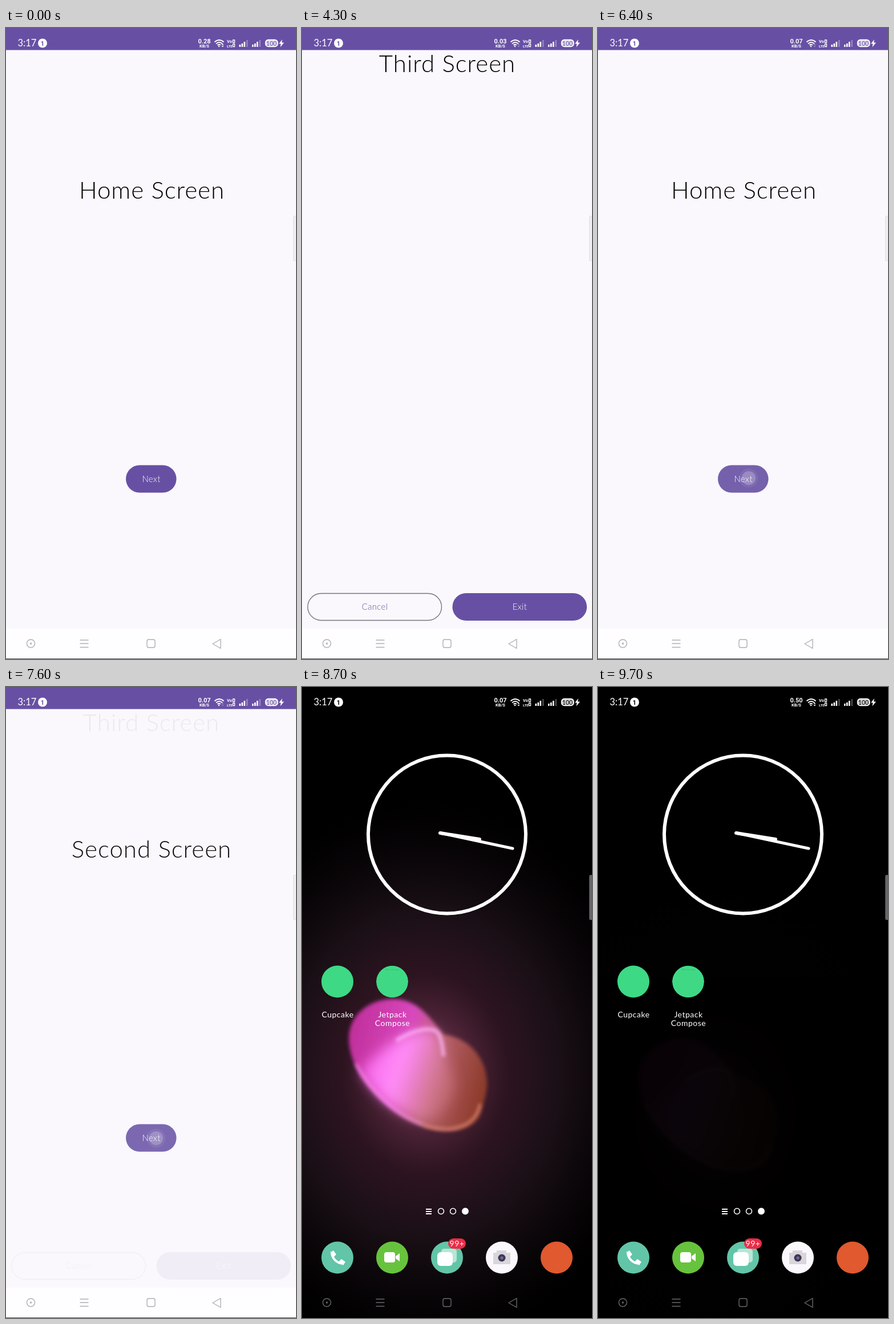
These frames come from a looping animation (508x1102 px, 10000 ms). An HTML page:

```html
<!DOCTYPE html>
<html lang="en">
<head>
<meta charset="utf-8">
<title>Screen navigation</title>
<style>
  html, body { margin: 0; height: 100%; overflow: hidden; background: #000; }
  svg { display: block; width: 100vw; height: 100vh; font-family: Lato, sans-serif; font-weight: 300; }
  .title { font-size: 42px; letter-spacing: 1px; text-anchor: middle; fill: #000; }
  .label { font-size: 15px; letter-spacing: .3px; text-anchor: middle; fill: #fff; }
  .app { font-size: 14px; letter-spacing: .5px; text-anchor: middle; fill: #fff; font-weight: 400; }
  .bold { font-family: Roboto, sans-serif; font-weight: 700; }
  .line { fill: none; stroke-width: 1.4; }
  #status { color: #6750a4; }
</style>
</head>
<body>
<svg viewBox="0 0 508 1102" preserveAspectRatio="none">
  <defs>
    <filter id="soft" x="-50%" y="-50%" width="200%" height="200%"><feGaussianBlur stdDeviation="3"/></filter>
    <filter id="softer" x="-50%" y="-50%" width="200%" height="200%"><feGaussianBlur stdDeviation="11"/></filter>
    <radialGradient id="haze">
      <stop offset="0" stop-color="#b0507f" stop-opacity=".75"/>
      <stop offset=".36" stop-color="#70324f" stop-opacity=".4"/>
      <stop offset=".6" stop-color="#3c2433" stop-opacity=".42"/>
      <stop offset="1" stop-color="#1c0f18" stop-opacity="0"/>
    </radialGradient>
    <linearGradient id="petal" x1="0" y1=".3" x2="1" y2=".55">
      <stop offset="0" stop-color="#c0309c"/>
      <stop offset=".4" stop-color="#d948bd"/>
      <stop offset=".62" stop-color="#b9636f"/>
      <stop offset="1" stop-color="#8e3c2c"/>
    </linearGradient>
    <linearGradient id="fold" x1="0" y1="0" x2="1" y2=".35">
      <stop offset="0" stop-color="#f655e6"/>
      <stop offset=".5" stop-color="#ff8df8"/>
      <stop offset="1" stop-color="#d9808f" stop-opacity=".5"/>
    </linearGradient>
    <clipPath id="cardClip"><rect id="cardRect" width="508" height="1102"/></clipPath>
    <g id="next">
      <rect x="210" y="763.5" width="88.5" height="48" rx="24" fill="#6750a4"/>
      <text class="label" x="254.5" y="793">Next</text>
    </g>
    <g id="bars" fill="#fff">
      <path d="M0 29h2.6v4H0zM4 27h2.6v6H4zM8 24h2.6v9H8z"/>
      <path d="M12.5 21h2.6v12h-2.6z" opacity=".3"/>
    </g>
  </defs>

  <g id="home">
    <g id="glow">
      <ellipse cx="215" cy="675" rx="400" ry="480" fill="url(#haze)"/>
      <path filter="url(#soft)" fill="url(#petal)" d="M82 615C82 570 120 545 160 545C205 545 225 580 248 607C290 612 322 645 324 690C324 712 316 730 314 742C306 768 278 776 250 775C212 772 180 757 150 732C112 700 84 660 82 615Z"/>
      <path filter="url(#softer)" fill="url(#fold)" d="M104 672C130 636 180 600 225 598C246 605 246 640 268 690C262 740 228 762 208 755C164 745 124 706 104 672Z"/>
      <path filter="url(#soft)" fill="none" stroke="#ff9cf2" stroke-width="3" d="M94 658C120 706 165 748 212 764"/>
      <path filter="url(#soft)" fill="none" stroke="#e38a78" stroke-width="4" d="M212 765C262 782 305 768 312 728"/>
      <path filter="url(#soft)" fill="none" stroke="#ffb5fb" stroke-width="5" d="M165 618C195 598 228 592 238 604C245 614 246 630 248 645"/>
    </g>
    <g id="desk">
      <g fill="none" stroke="#fff" stroke-linecap="round">
        <circle cx="254" cy="257.5" r="138" stroke-width="6"/>
        <path d="M242 255L311 266" stroke-width="6"/>
        <path d="M242 255L369 282" stroke-width="5"/>
      </g>
      <circle cx="62" cy="514.5" r="28" fill="#3dd984"/>
      <circle id="icon" cx="158" cy="514.5" r="28" fill="#3dd984"/>
      <text class="app" x="62.5" y="577">Cupcake</text>
      <text class="app" x="158.5" y="577">Jetpack</text>
      <text class="app" x="158.5" y="592">Compose</text>
      <g fill="none" stroke="#fff" stroke-width="1.5">
        <path d="M217 912h10M217 916h10M217 920h10" stroke-width="2"/>
        <circle cx="243.5" cy="915.5" r="5"/>
        <circle cx="264.5" cy="915.5" r="5"/>
        <circle cx="286" cy="915.5" r="5.2" fill="#fff"/>
      </g>
      <circle cx="62" cy="996.5" r="28" fill="#62c5a7"/>
      <path d="M52 986C52 999 62 1007 73 1007" fill="none" stroke="#fff" stroke-width="4"/>
      <path d="M50 988l5-4 5 7-4 4zM65 1003l4-4 7 5-4 6z" fill="#fff"/>
      <circle cx="158" cy="996.5" r="28" fill="#67c33d"/>
      <rect x="144" y="987" width="19" height="18" rx="4" fill="#fff"/>
      <path d="M164 994l7-5v14l-7-5z" fill="#fff"/>
      <circle cx="254" cy="996.5" r="28" fill="#62c5a7"/>
      <rect x="244" y="981" width="27" height="24" rx="5" fill="#b8e5d7"/>
      <rect x="237" y="987" width="27" height="24" rx="6" fill="#fff"/>
      <rect x="256" y="963" width="31" height="18" rx="9" fill="#ec2c47"/>
      <text class="app" x="271.5" y="976.5">99+</text>
      <circle cx="350" cy="996.5" r="28" fill="#fbf8fd"/>
      <path d="M341 984h17v4h7v20h-30v-20h6z" fill="#d8d6da"/>
      <circle cx="350" cy="997" r="6.5" fill="#3f3855"/>
      <circle cx="350" cy="997" r="2.5" fill="#8068a0"/>
      <circle cx="446" cy="996.5" r="28" fill="#e0592f"/>
    </g>
    <g id="card" clip-path="url(#cardClip)">
      <g id="cardBack">
        <rect width="508" height="1102" fill="#faf8fc"/>
        <rect width="508" height="37.5" fill="#6750a4"/>
      </g>
      <circle id="splash" cx="254" cy="256"/>
      <text id="cardTitle" class="title" x="254.5" y="77">Third Screen</text>
    </g>
  </g>

  <g id="appView">
    <rect width="508" height="1102" fill="#faf8fc"/>
    <rect width="508" height="38.5" fill="#6750a4"/>
    <g id="s0"><text class="title" x="255.5" y="297.5">Home Screen</text><use href="#next"/></g>
    <g id="s1"><text class="title" x="255" y="297.5">Second Screen</text><use href="#next"/></g>
    <g id="s2">
      <text class="title" x="254.5" y="77">Third Screen</text>
      <rect x="10" y="987.5" width="234.5" height="47" rx="23.5" fill="none" stroke="#79747e" stroke-width="1.4"/>
      <text class="label" x="127.5" y="1016" style="fill:#6750a4">Cancel</text>
      <rect x="263.5" y="987" width="235.5" height="48" rx="24" fill="#6750a4"/>
      <text class="label" x="381.5" y="1016">Exit</text>
    </g>
    <rect id="ripple" rx="24"/>
    <rect y="1049" width="508" height="53" fill="#fefdff"/>
    <rect y="1101" width="508" height="1" fill="#55535a"/>
  </g>

  <g id="nav" class="line">
    <circle cx="43.5" cy="1075" r="7"/><circle cx="43.5" cy="1075" r="1"/>
    <path d="M129.500 1069h15M129.500 1075h15M129.500 1081.500h15"/>
    <rect x="247" y="1068" width="14" height="14" rx="3"/>
    <path d="M362 1075.500L376 1067.500V1083.500Z" stroke-linejoin="round"/>
  </g>
  <rect id="handle" x="503.500" y="328.500" width="6" height="78" rx="2"/>

  <g id="status" fill="#fff">
    <text x="20.500" y="32" font-size="16.500" font-weight="400">3:17</text>
    <circle cx="64" cy="26.500" r="8"/>
    <text class="bold" x="64" y="30.500" font-size="11" text-anchor="middle" fill="currentColor">1</text>
    <g class="bold" text-anchor="middle">
      <text id="speed" x="347.500" y="27" font-size="11"></text>
      <text x="347.500" y="34" font-size="7.500">KB/S</text>
    </g>
    <g fill="none" stroke="#fff" stroke-width="1.700">
      <path d="M365.500 24.500Q373.500 17.500 381.500 24.500M368 27.500Q373.500 22.500 379 27.500M370.500 30Q373.500 27.500 376 30"/>
    </g>
    <circle cx="373" cy="32" r="1.300"/>
    <path id="arrows" d="M377.500 29.500l2-2.500 2 2.500zM377.500 31l2 2.500 2-2.500z"/>
    <g class="bold" font-size="7.500">
      <text x="387" y="26">Vo</text>
      <text x="387" y="33.500" font-size="6">LTE</text>
    </g>
    <path d="M397.500 21h3v4.500h-3zM397.500 28h3v4.500h-3z" fill="none" stroke="#fff" stroke-width="1.300"/>
    <use href="#bars" x="408.500"/>
    <use href="#bars" x="431"/>
    <rect x="454.500" y="20.500" width="21.500" height="12" rx="5" fill-opacity=".8" stroke="#fff" stroke-width="1.400"/>
    <text x="465" y="30.500" font-size="10.500" font-weight="400" text-anchor="middle" fill="currentColor">100</text>
    <path d="M484 20l-6 7.500h3.500l-1 6 6.500-8h-4z"/>
  </g>

  <g id="touch" fill="#fff">
    <circle r="16.500" opacity=".22"/>
    <circle r="12" opacity=".85"/>
  </g>
</svg>
<script>
const $ = id => document.getElementById(id);
const set = (id, attrs) => { for (const k in attrs) $(id).setAttribute(k, attrs[k]); };
const clamp = v => Math.max(0, Math.min(1, v));
const lerp = (a, b, p) => a + (b - a) * p;

// cubic-bezier(.4, 0, .2, 1)
function ease(u) {
  u = clamp(u);
  let lo = 0, hi = 1;
  for (let i = 0; i < 24; i++) {
    const s = (lo + hi) / 2, r = 1 - s;
    if (1.2 * s * r * r + .6 * s * s * r + s * s * s < u) lo = s; else hi = s;
  }
  return lo * lo * (3 - 2 * lo);
}

const EXIT = 8300, FADE = 700;
const buttons = {
  next: { x: 210, y: 763.5, width: 88.5, height: 48, fill: '#fff' },
  cancel: { x: 10, y: 987, width: 235, height: 48, fill: '#6750a4' },
  exit: { x: 263.5, y: 987, width: 235.5, height: 48, fill: '#fff' }
};
const taps = [
  { down: 2000, up: 2500, x: 261, y: 793, on: 'next', go: 2150, to: 1 },
  { down: 3100, up: 3350, x: 262, y: 791, on: 'next', go: 3400, to: 2 },
  { down: 4900, up: 5150, x: 150, y: 1011, on: 'cancel', go: 5200, to: 0 },
  { down: 6100, up: 6250, x: 264, y: 786, on: 'next', go: 6400, to: 1 },
  { down: 7200, up: 7450, x: 263, y: 788, on: 'next', go: 7500, to: 2 },
  { down: 8100, up: 8150, x: 398, y: 1011, on: 'exit', go: Infinity }
];
const speeds = [[0, '0.28'], [100, '0.16'], [500, '0.10'], [900, '0.03'], [5000, '0.07'], [9000, '0.50']];

function drawApp(t) {
  let from = 0, to = 0, mix = 1;
  for (const tap of taps) if (t >= tap.go) {
    from = to;
    to = tap.to;
    mix = ease((t - tap.go) / FADE);
  }
  for (let i = 0; i < 3; i++) {
    set('s' + i, { opacity: i === to ? mix : i === from ? 1 - mix : 0 });
  }
}

function drawTouch(t) {
  const tap = taps.filter(a => t >= a.down).pop();
  if (!tap) return set('touch', { opacity: 0 }), set('ripple', { opacity: 0 });
  const press = clamp((t - tap.down + 100) / 200);
  set('touch', {
    transform: `translate(${tap.x} ${tap.y})`,
    opacity: .75 * press * clamp(1 - (t - tap.up) / 250)
  });
  set('ripple', { ...buttons[tap.on], opacity: .13 * press * clamp(1 - (t - tap.up) / 500) });
}

function drawHome(t) {
  const p = ease((t - EXIT + 100) / 370);
  const w = lerp(508, 56, p);
  const zoom = .87 + .13 * p;
  set('desk', {
    transform: `translate(254 551) scale(${zoom}) translate(-254 -551)`,
    opacity: clamp(.1 + (t - EXIT) / 330)
  });
  set('icon', { opacity: p < 1 ? 0 : 1 });
  set('card', {
    transform: `translate(${130 * p} ${486.5 * p}) scale(${w / 508})`,
    opacity: p < 1 ? 1 : 0
  });
  set('cardRect', { height: 508 * (1 + 1.17 * (1 - p) ** 2.3), rx: 254 * p ** 1.26 });
  set('cardBack', { opacity: 1 - p ** 2.3 });
  set('cardTitle', { opacity: clamp(1.3 - p) });
  set('splash', { r: 508 * lerp(.36, .5, p), fill: `hsl(147 67% ${lerp(97, 55, clamp(p * 1.4 - .4))}%)` });
  const sink = clamp((t - 8800) / 700);
  set('glow', {
    opacity: clamp((t - EXIT) / 400) * (1 - .96 * sink),
    transform: `translate(${-10 * sink} ${70 * sink})`
  });
}

function draw(t) {
  const out = t >= EXIT;
  $('appView').style.display = out ? 'none' : '';
  $('home').style.display = out ? '' : 'none';
  if (out) drawHome(t); else drawApp(t);
  drawTouch(t);
  set('nav', { stroke: out ? '#6b686c' : '#b0aeb4', opacity: out ? clamp((t - EXIT) / 300) : 1 });
  set('handle', { fill: out ? '#68666a' : '#f0eef2', stroke: out ? '#57555a' : '#dfdde2' });
  $('status').style.color = out ? '#000' : '#6750a4';
  set('arrows', { opacity: t < 900 || out ? 1 : .3 });
  $('speed').textContent = speeds.filter(s => t >= s[0]).pop()[1];
}

const start = performance.now();
function tick(now) {
  draw(Math.floor(Math.max(0, now - start) % 10000 / 100) * 100);
  requestAnimationFrame(tick);
}
draw(0);
requestAnimationFrame(tick);
</script>
</body>
</html>
```
